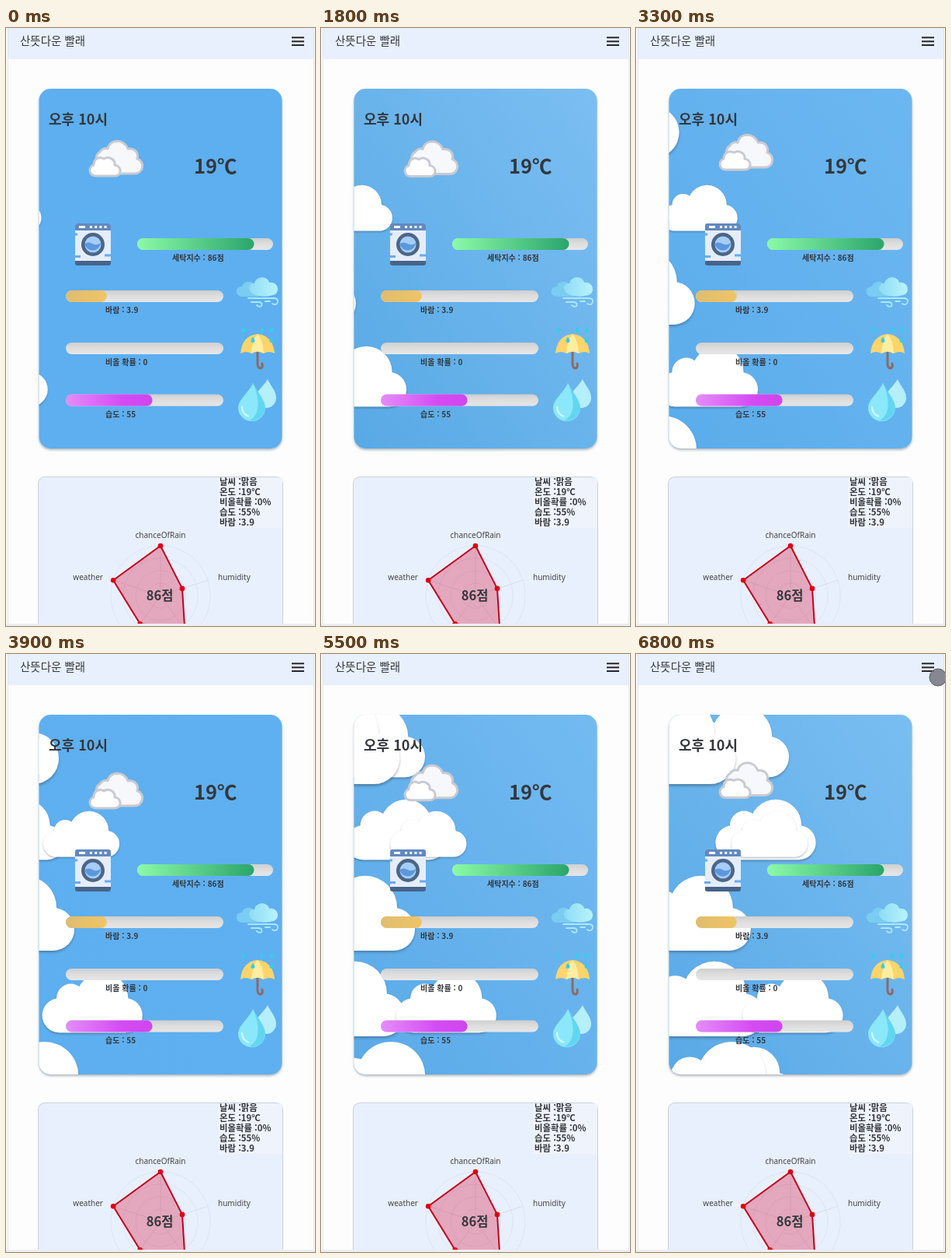
Animation of 398 by 768 pixels, one loop 6900 ms. Source, as an HTML page:

```html
<!DOCTYPE html>
<html lang="ko">
<head>
<meta charset="utf-8">
<style>
html, body { margin: 0; width: 100%; height: 100%; overflow: hidden; background: #fdfdfd; }
svg { display: block; width: 100vw; height: 100vh; }
text { font-family: "Noto Sans CJK KR", "Noto Sans CJK", "Noto Sans", sans-serif; fill: #34373c; }
.strong { font-weight: 700; }
.label { font-size: 10px; font-weight: 700; }
.info { font-size: 11.4px; font-weight: 700; }
.axis { font-family: "Noto Sans", "Open Sans", sans-serif; font-size: 10px; fill: #444; }
</style>
</head>
<body>
<svg viewBox="0 0 398 768" preserveAspectRatio="none">
  <defs>
    <linearGradient id="sky" x1="0" y1="1" x2="1" y2="0">
      <stop id="skyStart"/><stop id="skyEnd" offset="1"/>
    </linearGradient>
    <linearGradient id="track" x2="0" y2="1">
      <stop stop-color="#cfcfcf"/><stop offset=".5" stop-color="#dedede"/><stop offset="1" stop-color="#e6e6e6"/>
    </linearGradient>
    <linearGradient id="green"><stop stop-color="#8bfaa8"/><stop offset="1" stop-color="#2ba56c"/></linearGradient>
    <linearGradient id="yellow"><stop stop-color="#dfbd70"/><stop offset="1" stop-color="#f0c465"/></linearGradient>
    <linearGradient id="purple"><stop stop-color="#e58df8"/><stop offset=".65" stop-color="#d44bf4"/><stop offset="1" stop-color="#cf46ee"/></linearGradient>
    <linearGradient id="breeze"><stop stop-color="#8fdcf6"/><stop offset="1" stop-color="#b8f4fb"/></linearGradient>
    <filter id="shadow" x="-20%" y="-20%" width="140%" height="140%">
      <feDropShadow dx="0" dy="2" stdDeviation="1.6" flood-color="#345" flood-opacity=".38"/>
    </filter>
    <filter id="soft" x="-20%" y="-20%" width="140%" height="150%">
      <feDropShadow dx="0" dy="5" stdDeviation="3" flood-color="#345" flood-opacity=".4"/>
    </filter>
    <clipPath id="card"><rect x="42.5" y="78" width="313" height="462" rx="15"/></clipPath>
    <g id="cloudShape" fill="#fff">
      <rect x="-350" width="350" height="120" rx="60"/>
      <circle cx="-250" r="50"/>
      <circle cx="-140" r="90"/>
    </g>
    <path id="drop" d="M0-3.500C1-1 2.500 0 2.500 1.400A2.500 2.500 0 0 1-2.500 1.400C-2.500 0-1-1 0-3.500Z" fill="#35cdec"/>
  </defs>

  <rect width="398" height="768" fill="#fdfdfd"/>
  <rect x="3" width="393" height="40" fill="#e8f0fe"/>
  <path d="M2.5 0V768M396.5 0V768" stroke="#e3e4e8"/>
  <text x="18" y="22" font-size="14.5">산뜻다운 빨래</text>
  <path d="M368 12.3h16M368 17.2h16M368 22.1h16" stroke="#25282e" stroke-width="2"/>

  <rect x="42.5" y="78" width="313" height="462" rx="15" fill="url(#sky)" filter="url(#shadow)"/>
  <g id="clouds" clip-path="url(#card)"></g>

  <text x="55" y="124" font-size="18" class="strong">오후 10시</text>
  <text x="242" y="187" font-size="25.5" class="strong">19℃</text>

  <g id="bobbing" stroke="#c9cad2" stroke-width="3" stroke-linejoin="round">
    <path fill="#f7f8fb" d="M121 44C115 30 114 20 121 16C124 11 129 11 131 12C134-1 152-1 157 12C167 11 171 18 169 25C179 28 178 44 165 44Z"/>
    <path fill="#fff" d="M116 47C106 47 106 35 113 33C113 24 121 22 126 25C133 21 141 26 140 33C149 34 150 47 140 47Z"/>
  </g>

  <g id="washer">
    <rect x="89" y="251" width="46" height="53" rx="3" fill="#e5edfa"/>
    <path d="M89 260v-6q0-3 3-3h40q3 0 3 3v6z" fill="#6289c0"/>
    <path d="M94 255.5h8" stroke="#fff" stroke-width="3"/>
    <path d="M108 255.5h22" stroke="#fff" stroke-width="3" stroke-dasharray="3 3.2"/>
    <path d="M89 299h46v3q0 3-3 3H92q-3 0-3-3z" fill="#476489"/>
    <path d="M88 293.500h8M127 292h8M88 265h4" stroke="#69a9f4" stroke-width="3"/>
    <circle cx="112" cy="278" r="15" fill="#4b6688"/>
    <circle cx="112" cy="278" r="10.500" fill="#a5cdf6"/>
    <path d="M101.500 277q5-3 10 0t10.500-1A10.500 10.500 0 0 1 101.500 278Z" fill="#5b97dd"/>
  </g>

  <g id="wind">
    <path fill="#7accf1" d="M303 345C294 343 295 332 304 332C306 324 318 324 320 331C330 328 334 345 323 345Z"/>
    <path fill="url(#breeze)" d="M319 342C309 336 313 327 320 328C322 318 337 318 339 327C351 325 354 341 344 343Q331 347 319 342Z"/>
    <path d="M312 347H344Q351 347 350 352Q348 357 343 354M316 352H326Q331 353 329 357Q326 359 323 356M334 351H340" fill="none" stroke="#a9e9fa" stroke-width="1.800" stroke-linecap="round"/>
  </g>

  <g id="umbrella">
    <path d="M324 411V431Q324 437 328 437Q331 436 330 431" fill="none" stroke="#8b6b67" stroke-width="3" stroke-linecap="round"/>
    <path d="M302 418Q304 395 324 393Q344 395 346 418Q339 414 332 418Q324 413 316 418Q309 414 302 418Z" fill="#fbd56c"/>
    <path d="M316 418Q317 400 324 393Q331 400 332 418Q324 413 316 418Z" fill="#ffeda0"/>
    <g id="rain"></g>
  </g>

  <g id="water">
    <path d="M337 451C341 460 348 466 348 475A13 13 0 0 1 322 475C322 466 332 460 337 451Z" fill="#b4effa"/>
    <path d="M318 456C324 468 334 478 334 488A17.500 17 0 0 1 299 488C299 477 313 468 318 456Z" fill="#8be8fb"/>
    <path d="M318 456C324 468 334 478 334 488A17.500 17 0 0 1 314 504C328 496 327 476 318 456Z" fill="#62d6f1"/>
    <path d="M304 486Q304 496 313 499" fill="none" stroke="#d5f8ff" stroke-width="2"/>
  </g>

  <g id="bars"></g>

  <path d="M41.500 768V586q0-9.500 9.500-9.500H347q9.500 0 9.500 9.500V768" fill="#e8f0fe" stroke="#ccd0d9"/>
  <rect x="273" y="577.500" width="83" height="65" fill="#eef3fc"/>
  <g id="info"></g>
  <g id="radar"></g>
  <text x="198" y="735" font-size="16.5" class="strong" text-anchor="middle">86점</text>
  <rect y="765" width="398" height="3" fill="#eceef2"/>
  <circle id="pointer" r="11" fill="#73767e" fill-opacity=".85" stroke="#5d6068"/>
</svg>
<script>
const LOOP = 6900, STEP = 100;
const byId = id => document.getElementById(id);
const add = (parent, tag, attrs, text) => {
  const node = document.createElementNS("http://www.w3.org/2000/svg", tag);
  for (const key in attrs) node.setAttribute(key, attrs[key]);
  if (text) node.textContent = text;
  return byId(parent).appendChild(node);
};

// Right edge moves linearly; speed is in pixels per second.
const clouds = [
  { y: 106, scale: .435, right: -132.8, speed: 48.5 },
  { y: 101, scale: .55, right: -13.1, speed: 20.8 },
  { y: 220, scale: .369, right: -135.6, speed: 54 },
  { y: 227, scale: .28, right: 45.5, speed: 25.8 },
  { y: 326, scale: .458, right: 7.7, speed: 20.6 },
  { y: 436, scale: .458, right: -134.2, speed: 44 },
  { y: 442, scale: .369, right: 53.7, speed: 31.3 },
  { y: 538, scale: .369, right: -136.3, speed: 50 },
  { y: 542, scale: .49, right: 18.5, speed: 25.5 }
];
for (const cloud of clouds) {
  cloud.node = add("clouds", "use", { href: "#cloudShape", filter: "url(#soft)" });
}

const bars = [
  [169, 270, 175, .86, "green", 214, "세탁지수 : 86점"],
  [77, 337, 203, .26, "yellow", 128, "바람 : 3.9"],
  [77, 404, 203, 0, "", 128, "비올 확률 : 0"],
  [77, 470.5, 203, .55, "purple", 128, "습도 : 55"]
];
for (const [x, y, width, part, color, labelX, label] of bars) {
  const shape = { x, y, height: 15, rx: 7.5 };
  add("bars", "rect", { ...shape, width, fill: "url(#track)" });
  if (part) add("bars", "rect", { ...shape, width: width * part, fill: `url(#${color})` });
  add("bars", "text", { x: labelX, y: y + 29, class: "label" }, label);
}

["날씨 :맑음", "온도 :19℃", "비올확률 :0%", "습도 :55%", "바람 :3.9"].forEach((line, i) =>
  add("info", "text", { x: 275, y: 587.3 + i * 13, class: "info" }, line));

for (const [x, y] of [[306, 387], [330, 387], [342, 387], [318, 400], [342, 400]]) {
  add("rain", "use", { href: "#drop", x, y });
}

const polar = (index, part) => {
  const angle = (index * 72 - 90) * Math.PI / 180;
  return [199 + 64 * part * Math.cos(angle), 729 + 64 * part * Math.sin(angle)];
};
const grid = { fill: "none", stroke: "#d3d8e2", "stroke-width": .8 };
for (const r of [16, 32, 48, 64]) {
  add("radar", "circle", { cx: 199, cy: 729, r, ...grid, "stroke-dasharray": "2 1" });
}
for (let i = 0; i < 5; i++) add("radar", "path", { d: `M199 729L${polar(i, 1)}`, ...grid });
const points = [1, .46, .83, .7, 1].map((part, i) => polar(i, part));
add("radar", "polygon", { points: points.join(" "), fill: "#d9274d", "fill-opacity": .36, stroke: "#c2001f", "stroke-width": 2 });
for (const [cx, cy] of points) add("radar", "circle", { cx, cy, r: 3.3, fill: "#dc0010" });
add("radar", "text", { x: 199, y: 655, class: "axis", "text-anchor": "middle" }, "chanceOfRain");
add("radar", "text", { x: 125, y: 709, class: "axis", "text-anchor": "end" }, "weather");
add("radar", "text", { x: 273, y: 709, class: "axis" }, "humidity");

const mix = (from, to, k) => `rgb(${from.map((v, i) => Math.round(v + (to[i] - v) * k))})`;
const baseSky = [93, 175, 240];

function draw(ms) {
  const t = ms / 1000;
  for (const { node, y, scale, right, speed } of clouds) {
    node.setAttribute("transform", `translate(${right + speed * t} ${y}) scale(${scale})`);
  }
  const bob = 143 + 8 * Math.sin(2 * Math.PI * t / 1.21);
  byId("bobbing").setAttribute("transform", `translate(0 ${bob})`);

  const contrast = (1 - Math.cos(2 * Math.PI * (t - .15) / 4.1)) / 2;
  byId("skyStart").setAttribute("stop-color", mix(baseSky, [88, 168, 228], contrast));
  byId("skyEnd").setAttribute("stop-color", mix(baseSky, [126, 192, 242], contrast));

  const entry = Math.min(1, Math.max(0, (t - 6.6) / .2));
  byId("pointer").setAttribute("transform", `translate(${411 - 22 * entry} ${42 - 12 * entry})`);
}

const start = performance.now();
function tick() {
  const elapsed = (performance.now() - start) % LOOP;
  draw(Math.floor(elapsed / STEP) * STEP);
  requestAnimationFrame(tick);
}
tick();
</script>
</body>
</html>
```
